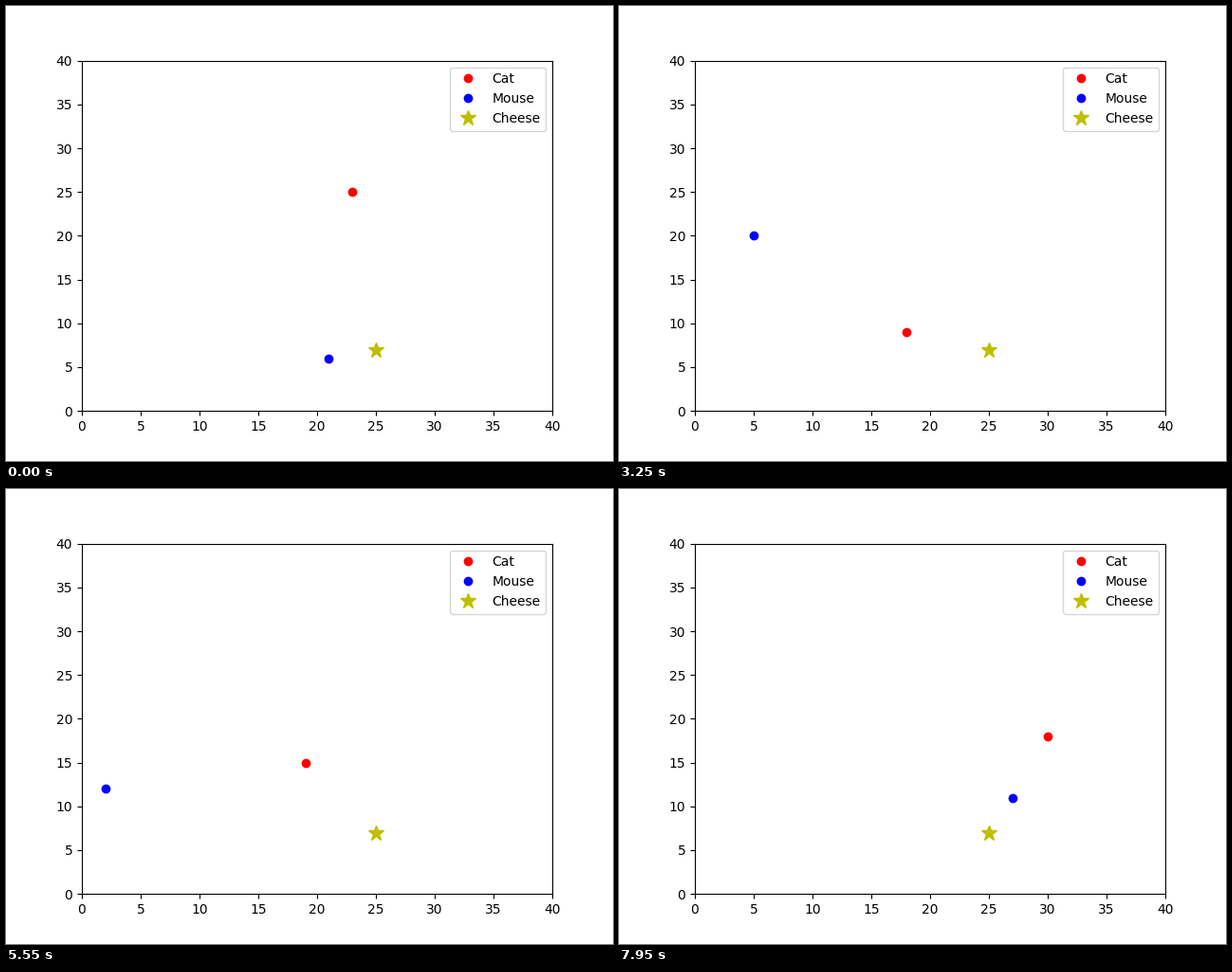
A matplotlib script for the animation above (8000 ms loop, 640 by 480 pixels).

```python
import math

import numpy as np
import matplotlib.pyplot as plt
from matplotlib.animation import FuncAnimation

STEPS = 160
INTERVAL = 50
SIZE = 40
MOUSE_SPEED = 2  # cells per step, the cat makes one

CAT_START = (23, 25)
CORNERS = [  # where the mouse changes direction
    (21, 6), (19, 8), (19, 36), (23, 33), (39, 32), (39, 34), (39, 22),
    (36, 22), (39, 8), (31, 0), (21, 0), (21, 2), (19, 0), (1, 12),
    (1, 16), (23, 38), (13, 39), (25, 38), (33, 29), (33, 21), (31, 19),
    (31, 17), (17, 3), (11, 3), (0, 14), (0, 21), (0, 15), (2, 15),
    (10, 23), (10, 35), (14, 39), (20, 39), (22, 37), (39, 20), (39, 22),
    (39, 15), (39, 17), (35, 15), (35, 11), (27, 11),
]


def run(corners):
    """Run straight from corner to corner, on whole cells."""
    path = [np.array(corners[0])]
    for start, end in zip(np.array(corners), np.array(corners[1:])):
        leg = end - start
        count = math.ceil(abs(leg).max() / MOUSE_SPEED)
        path += [np.rint(start + leg * i / count) for i in range(1, count + 1)]
    return path


def chase(start, prey):
    """Step to the neighbouring cell that lies towards the prey."""
    path = [np.array(start)]
    for target in prey[:-1]:
        gap = target - path[-1]
        path.append(path[-1] + np.rint(gap / max(np.hypot(*gap), 1)))
    return path


mouse_path = run(CORNERS)
cat_path = chase(CAT_START, mouse_path)

fig, ax = plt.subplots(figsize=(6.4, 4.8), dpi=100)
ax.set_xlim(0, SIZE)
ax.set_ylim(0, SIZE)

cat, = ax.plot(*cat_path[0], "ro", label="Cat")
mouse, = ax.plot(*mouse_path[0], "bo", label="Mouse")
ax.plot(25, 7, "y*", markersize=12, label="Cheese")
# "best" lets the legend jump aside when an animal runs under it
ax.legend(loc="best")


def update(step):
    for dot, path in ((cat, cat_path), (mouse, mouse_path)):
        x, y = path[step]
        dot.set_data([x], [y])
    return cat, mouse


anim = FuncAnimation(fig, update, frames=STEPS, interval=INTERVAL,
                     repeat=True, repeat_delay=0, blit=False)
plt.show()
```
